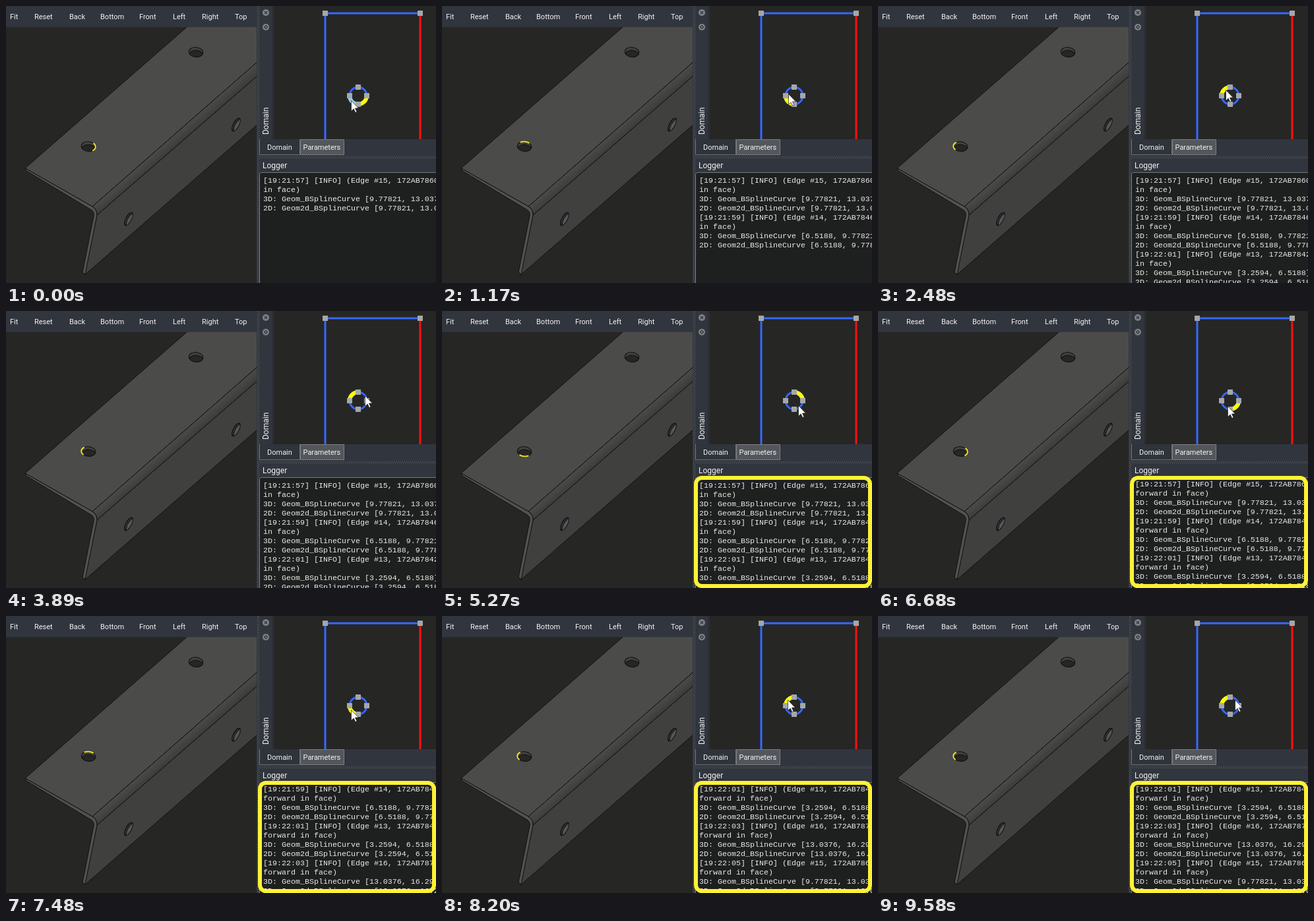
An HTML page that plays this animation: 652x420 px, repeating every 9620 ms.

```html
<!DOCTYPE html>
<html lang="en">
<head>
<meta charset="utf-8">
<title>Edge picking in a parametric domain</title>
<style>
  html, body { margin: 0; width: 100%; height: 100%; overflow: hidden; background: #31353d; }
  #stage { position: relative; width: 652px; height: 420px; overflow: hidden; contain: strict; }
  svg { position: absolute; left: 0; top: 0; display: block; }
  text { font: 11px Roboto, Inter, sans-serif; fill: #f2f3f4; }
  .big { font-size: 12px; }
  #log {
    position: absolute; left: 390px; right: 0; bottom: 0; overflow: hidden; white-space: pre;
    font: 11.665px/14px "Liberation Mono", monospace; color: #e9e9e9;
  }
  .ink { stroke: #111; stroke-linejoin: round; }
  .line { fill: none; stroke: #3668ff; stroke-width: 3; }
  .dots { stroke: #656a70; stroke-dasharray: 1 2; }
</style>
</head>
<body>
<div id="stage">
<svg width="652" height="420">
  <defs>
    <linearGradient id="bend" gradientUnits="userSpaceOnUse" x1="131" y1="304" x2="140.500" y2="314.800">
      <stop offset="0" stop-color="#4b4b49"/><stop offset="1" stop-color="#3d3d3c"/>
    </linearGradient>
    <clipPath id="view"><path d="M0 32H380V420H0Z"/></clipPath>
    <clipPath id="rim"><ellipse rx="10.8" ry="7.4"/></clipPath>
    <g id="topHole" transform="rotate(6)">
      <ellipse rx="10.8" ry="7.4" fill="#414140"/>
      <ellipse class="ink" cx="1" cy="4.500" rx="10.8" ry="7.4" fill="#262625" clip-path="url(#rim)"/>
      <ellipse class="ink" rx="10.8" ry="7.4" fill="none"/>
    </g>
    <g id="sideHole" transform="rotate(28)">
      <ellipse class="ink" rx="4.2" ry="11" fill="#55565c"/>
      <path class="ink" d="M1 -10.4Q-4 0 1 10.4Q-4.2 11-4.2 0Q-4.2-11 1-10.4Z" fill="#333"/>
    </g>
    <rect id="knot" x="-4" y="-4" width="8" height="8" fill="#a5a7a9"/>
    <circle id="button" r="5" fill="#808285"/>
  </defs>

  <!-- 3D view -->
  <g clip-path="url(#view)">
    <path d="M0 32H380V420H0Z" fill="#262625"/>
    <path class="ink" d="M29 246L281 26H390V77L131 304Z" fill="#4b4b49"/>
    <path class="ink" d="M138 317L390 98V172L119 408Z" fill="#40403f"/>
    <path class="ink" d="M131 304L390 77V98L138 317Q138 308 131 304Z" fill="url(#bend)"/>
    <path class="ink" d="M29 246L131 304Q138 308 138 317L120 407L116 404L133 318Q134 312 129 309L31 250Z" fill="#515150"/>
    <use href="#topHole" x="125" y="213" transform="rotate(0)"/>
    <use href="#topHole" x="288" y="70"/>
    <use href="#sideHole" x="186" y="323"/>
    <use href="#sideHole" x="349" y="180"/>
    <ellipse id="rimArc" rx="10.8" ry="7.4" transform="translate(125 213) rotate(6)" fill="none"
      stroke="#f8f01c" stroke-width="1.8" pathLength="4" stroke-dasharray="1 3"/>
  </g>
  <g id="menu"></g>

  <!-- domain view -->
  <path d="M406 0H652V202H406Z" fill="#262625"/>
  <path d="M404.500 0V202" stroke="#2a2d33" stroke-width="2"/>
  <path class="dots" d="M381.500 0V420M383.500 1V420M385 228.500H652M386 230.500H652"/>
  <use href="#button" x="394" y="10"/><use href="#button" x="394" y="32"/>
  <path d="M392 8l4 4m0-4l-4 4M394 29.500l2.500 2.500l-2.500 2.500l-2.500-2.500z" fill="none" stroke="#31353d" stroke-width="1.2"/>
  <text class="big" transform="translate(398 195) rotate(-90)">Domain</text>
  <path class="line" d="M484 202V11H628"/>
  <path class="line" d="M628 11V202" style="stroke:#fa1010"/>
  <circle class="line" cx="534" cy="136" r="13"/>
  <path id="hover" class="line" d="M521 136A13 13 0 0 1 534 123" style="stroke:#92cdf0;stroke-width:6"/>
  <path id="pick" class="line" d="M521 136A13 13 0 0 1 534 123" style="stroke:#ff0;stroke-width:6"/>
  <use href="#knot" x="484" y="11"/><use href="#knot" x="628" y="11"/>
  <use href="#knot" x="534" y="123"/><use href="#knot" x="521" y="136"/>
  <use href="#knot" x="547" y="136"/><use href="#knot" x="534" y="149"/>

  <!-- tabs and logger -->
  <path d="M384.500 202V225.500H445.500V202" fill="#2f333a" stroke="#6d7074"/>
  <path d="M446.500 202.500H512.500V225.500H446.500Z" fill="#53565b" stroke="#7b7e82"/>
  <text x="396" y="218">Domain</text>
  <text x="450.500" y="218">Parameters</text>
  <text class="big" x="389" y="246">Logger</text>
  <path d="M660 252.500H387.500Q384.500 252.500 384.500 255.500V430H660Z" fill="#1e201f" stroke="#76797c"/>
</svg>
<div id="log"></div>
<svg width="652" height="420">
  <rect id="frame" x="385" y="253" width="264" height="164" rx="9" fill="none" stroke="#fdf233" stroke-width="6"/>
  <path id="mouse" d="M.5 .5V16.500L4.200 13L6.800 18.500L9 17.500L6.500 12H11.500Z" fill="#fff" stroke="#1a1a1a" stroke-width=".7"/>
</svg>
</div>
<script>
const LOOP = 9620, FRAME_AT = 4680, HOVER_LEAD = 340, STEP = 40;
const $ = id => document.getElementById(id);

const menu = { Fit: 6, Reset: 43, Back: 96, Bottom: 143, Front: 202, Left: 253, Right: 297, Top: 347 };
$("menu").innerHTML = Object.entries(menu)
  .map(([name, x]) => `<text x="${x}" y="20">${name}</text>`).join("");

// Each click picks the next quarter of the circle, clockwise
const clicks = [340, 1960, 4240, 5960, 7100, 8170];
const clicksBy = t => clicks.filter(c => c <= t).length;
const quarter = n => (n + 2) % 4; // 0 is top left

// Pointer glides: start, end, resting point
const home = [523, 143];
const glides = [
  [860, 1370, 526, 127], [2480, 3200, 544, 128], [4680, 5240, 540, 143], [5550, 5680, 542, 145],
  [6310, 6930, 523, 143], [7480, 8030, 524, 127], [8720, 9200, 541, 127]
];

function pointer(t) {
  let [x, y] = home;
  for (const [start, end, toX, toY] of glides) {
    if (t < start) break;
    const k = Math.min(1, (t - start + STEP) / (end - start + STEP));
    x += (toX - x) * k;
    y += (toY - y) * k;
  }
  return [Math.round(x), Math.round(y)];
}

// Edges 13 to 16 share the circle's parameter range in equal spans
const SPAN = 3.259402;
const addresses = { 13: "172AB7842", 14: "172AB7846", 15: "172AB7860", 16: "172AB7870" };

function entry(n, wrap) {
  const edge = 13 + (4 - quarter(n)) % 4;
  const seconds = 57 + 2 * n;
  const time = `19:${21 + Math.floor(seconds / 60)}:${String(seconds % 60).padStart(2, "0")}`;
  const range = [edge - 12, edge - 11].map(k => Number((k * SPAN).toPrecision(6))).join(", ");
  return `[${time}] [INFO] (Edge #${edge}, ${addresses[edge]}\n${wrap}\n` +
    `3D: Geom_BSplineCurve [${range}]\n2D: Geom2d_BSplineCurve [${range}]\n`;
}

function writeLog(count) {
  const scrolled = count >= 4;
  let text = "";
  for (let n = Math.max(0, count - 4); n <= count; n++)
    text += entry(n, scrolled ? "forward in face)" : "in face)");
  $("log").style.top = scrolled ? "256px" : "258px";
  $("log").textContent = text;
}

let logged;
function draw(t) {
  const count = clicksBy(t);
  const turn = n => `rotate(${90 * quarter(n)} 534 136)`;
  $("pick").setAttribute("transform", turn(count));
  $("hover").setAttribute("transform", turn(clicksBy(t + HOVER_LEAD)));
  $("rimArc").setAttribute("stroke-dashoffset", quarter(count) - 1.5);
  $("mouse").setAttribute("transform", `translate(${pointer(t)})`);
  $("frame").style.display = t < FRAME_AT ? "none" : "";
  if (count !== logged) writeLog(logged = count);
}

const begin = performance.now();
function tick() {
  draw((performance.now() - begin) % LOOP);
  requestAnimationFrame(tick);
}
tick();
</script>
</body>
</html>
```
